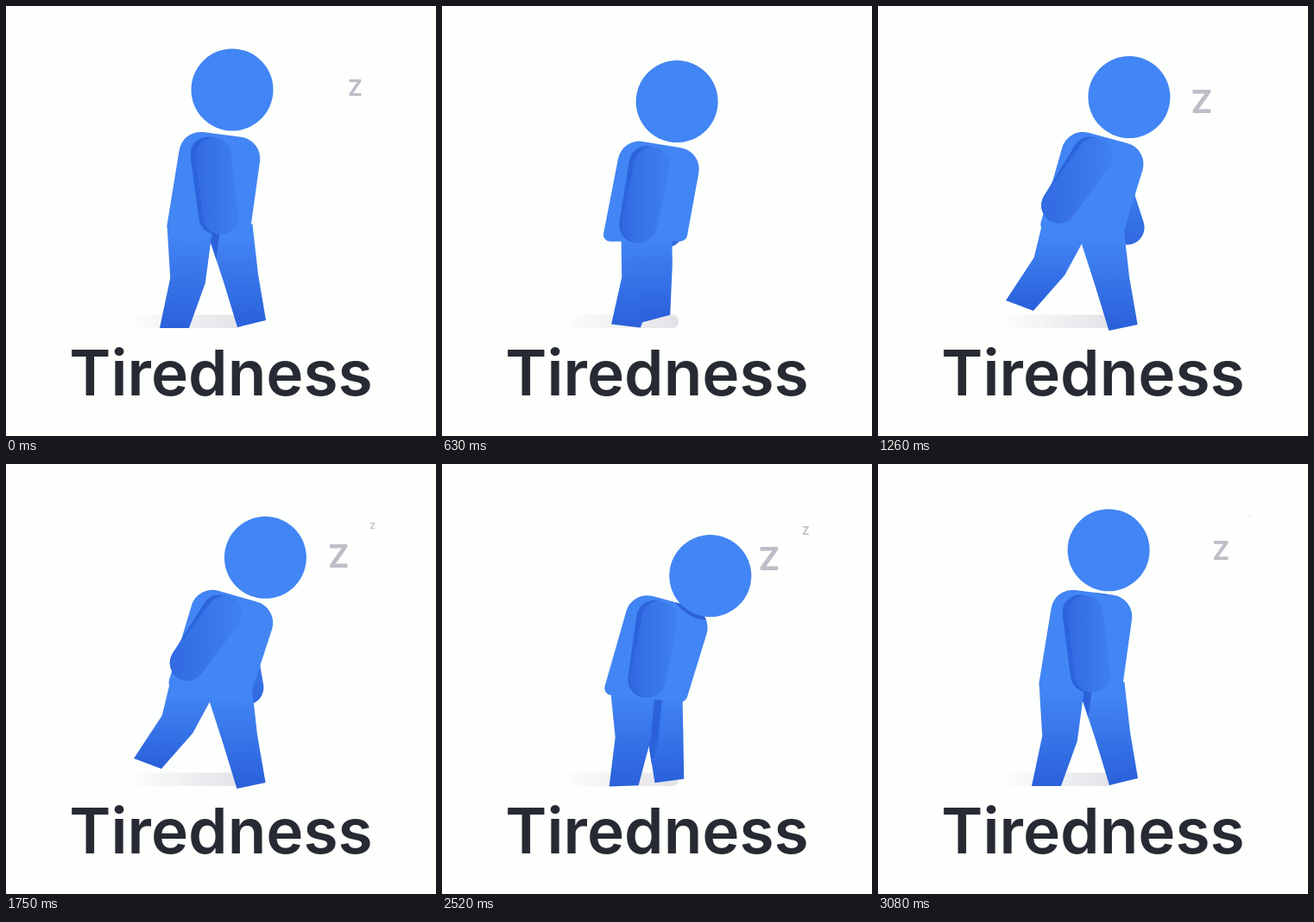
Write an HTML page with a canvas that moves like this. It is 498x498 px and loops after 3150 ms.

```html
<!DOCTYPE html>
<html lang="en">
<head>
<meta charset="utf-8">
<title>Tiredness</title>
<style>
  html, body { margin: 0; width: 100%; height: 100%; overflow: hidden; background: #fdfffc; }
  canvas, svg { position: absolute; left: 0; top: 0; width: 498px; height: 498px; }
  text {
    font: 600 73px Inter, "Open Sans", sans-serif;
    font-optical-sizing: none;
    fill: #282a33;
  }
</style>
</head>
<body>
<canvas id="stage"></canvas>
<svg viewBox="0 0 498 498"><text x="249" y="450.5" text-anchor="middle">Tiredness</text></svg>
<script>
const SIZE = 498, STEP = 70, FRAMES = 45;
const BLUE = '#4285f4', DEEP = '#2a60da', SHADE = '#2b62db', GREY = '#bdbdc7';

const canvas = document.getElementById('stage');
const ctx = canvas.getContext('2d');
const ratio = window.devicePixelRatio || 1;
canvas.width = canvas.height = SIZE * ratio;

// Smooth 0..1 ramp between two moments of the loop.
function ease(f, from, to) {
  const u = Math.min(1, Math.max(0, (f - from) / (to - from)));
  return u * u * (3 - 2 * u);
}

const mix = (a, b, u) => a.map((v, i) => v + (b[i] - v) * u);

function polar(x, y, length, degrees) {
  const a = degrees * Math.PI / 180;
  return [x, y, x + length * Math.sin(a), y + length * Math.cos(a)];
}

// Torso corners, clockwise from top left.
const UPRIGHT = [204.5, 143, 297.5, 155, 283, 259, 185, 263];
const LEANING = [222, 140, 316, 167, 282, 271, 186, 260];

// Hip, knee, sole centre and sole tilt in degrees.
const NEAR_BACK = [213, 255, 210.5, 318, 195, 373, 0];
const NEAR_FRONT = [258.5, 260, 271, 318, 284, 372.5, -12.3];
const FAR_FRONT = [259.5, 258, 272, 315, 284.5, 368, -13.6];
const FAR_BACK = [216, 257, 198.5, 301.5, 164, 347, 20.5];

function pose(f) {
  const stride = ease(f, 0, 16) - ease(f, 25, 40);
  const passing = 4 * stride * (1 - stride);
  const lean = ease(f, 3, 22) - ease(f, 34, 44);
  const swing = ease(f, 0, 20) - ease(f, 24, 45);
  const farSwing = ease(f, 0, 18) - ease(f, 18, 44);
  const awake = 1 - ease(f, 36, 46);
  const nod = ease(f, 0, 27) * awake, drop = ease(f, 26, 37) * awake;
  const sink = 11 * passing;

  const near = mix(NEAR_BACK, NEAR_FRONT, stride);
  const lift = f < 20 ? passing : 0;
  near[3] -= 18 * lift;
  near[5] -= 11 * lift;
  near[6] -= 8 * lift;

  const far = mix(FAR_FRONT, FAR_BACK, stride);
  far[3] += 11 * passing;
  far[5] += 26 * passing * stride;

  return {
    near, far, swing,
    head: [262 + 39 * nod + 10 * drop, 97 + 11.5 * nod + 15 * drop + sink],
    torso: mix(UPRIGHT, LEANING, lean).map((v, i) => i % 2 ? v + sink : v),
    arm: polar(240 + 13 * lean, 173 + sink, 71.5, 7 - 44 * swing),
    farArm: polar(266, 187, 73, -28 + 46 * farSwing)
  };
}

function blend(x0, y0, x1, y1, from, to) {
  const g = ctx.createLinearGradient(x0, y0, x1, y1);
  g.addColorStop(0, from);
  g.addColorStop(1, to);
  return g;
}

function fill(path, style) {
  ctx.fillStyle = style;
  ctx.fill(path);
}

function disc(x, y, r) {
  const p = new Path2D();
  p.arc(x, y, r, 0, 2 * Math.PI);
  return p;
}

function capsule([x0, y0, x1, y1], r) {
  const a = Math.atan2(y1 - y0, x1 - x0), q = Math.PI / 2, p = new Path2D();
  p.arc(x0, y0, r, a + q, a - q);
  p.arc(x1, y1, r, a - q, a + q);
  p.closePath();
  return p;
}

function legPath([hx, hy, kx, ky, fx, fy, tilt]) {
  const across = (x, y, half, a) => {
    const dx = half * Math.cos(a), dy = half * Math.sin(a);
    return [[x - dx, y - dy], [x + dx, y + dy]];
  };
  const normal = (dx, dy) => Math.atan2(-dx, dy);
  const hip = across(hx, hy, 26.5, normal(kx - hx, ky - hy));
  const knee = across(kx, ky, 20.5, normal(fx - hx, fy - hy));
  const sole = across(fx, fy, 17, tilt * Math.PI / 180);
  const p = new Path2D();
  [hip[0], knee[0], sole[0], sole[1], knee[1], hip[1]].forEach(q => p.lineTo(...q));
  p.closePath();
  return p;
}

function torsoPath(c) {
  const pts = [0, 2, 4, 6].map(i => [c[i], c[i + 1]]);
  const p = new Path2D();
  p.moveTo((c[0] + c[6]) / 2, (c[1] + c[7]) / 2);
  pts.forEach((q, i) => p.arcTo(...q, ...pts[(i + 1) % 4], i < 2 ? 25 : 8));
  p.closePath();
  return p;
}

function castOn(target, shape, dx, dy) {
  ctx.save();
  ctx.clip(target);
  ctx.translate(dx, dy);
  fill(shape, SHADE);
  ctx.restore();
}

function drawGround() {
  const p = new Path2D();
  p.roundRect(140, 357.5, 134, 15.5, [0, 7, 7, 0]);
  fill(p, blend(140, 0, 274, 0, 'rgba(226,226,232,0)', 'rgb(226,226,232)'));
}

// Each letter leaves from behind the head and shrinks away.
function drawSnores(f) {
  ctx.fillStyle = GREY;
  ctx.textAlign = 'center';
  for (let k = 0; k < 5; k++) {
    const start = 17 + 5.85 * k;
    const p = (f - start + 4 + FRAMES) % FRAMES - 4;
    const cap = Math.min(27, 3.4 * (10 - p), 9 * (p + 4));
    if (cap < 1) continue;
    const bend = p * Math.abs(p);
    const x = 365 + 10.1 * p - 0.33 * bend;
    const y = 114 - 2.8 * p - 0.31 * bend;
    ctx.font = `700 ${cap / 0.727}px Inter, "Open Sans", sans-serif`;
    ctx.fillText('Z', x, y + cap / 2);
  }
}

function drawFigure(f) {
  const { near, far, swing, head, torso, arm, farArm } = pose(f);
  const nearShape = legPath(near), farShape = legPath(far);
  const body = torsoPath(torso), face = disc(...head, 47.5);
  const legFill = leg => blend(0, leg[1] + 10, 0, leg[5] + 4, BLUE, DEEP);

  fill(capsule(farArm, 20), blend(0, 187, 0, 280, BLUE, '#2f67de'));
  fill(farShape, legFill(far));
  castOn(farShape, nearShape, 9, 0);
  fill(nearShape, legFill(near));
  fill(body, BLUE);
  castOn(body, face, -1, 4);

  const [sx, sy, hx, hy] = arm;
  fill(capsule([sx - 6, sy - 1, hx - 5 * (1 - swing), hy], 20.5), '#2b64dd');
  const left = Math.min(sx, hx) - 21, right = Math.max(sx, hx) + 21;
  fill(capsule(arm, 20.5), blend(left, 0, right, 0, '#326ae1', '#3f80f0'));
  fill(face, BLUE);
}

function render(now) {
  const f = Math.floor(now / STEP) % FRAMES;
  ctx.setTransform(ratio, 0, 0, ratio, 0, 0);
  ctx.clearRect(0, 0, SIZE, SIZE);
  drawGround();
  drawSnores(f);
  drawFigure(f);
}

const begin = performance.now();
function tick() {
  render(performance.now() - begin);
  requestAnimationFrame(tick);
}
tick();
</script>
</body>
</html>
```
